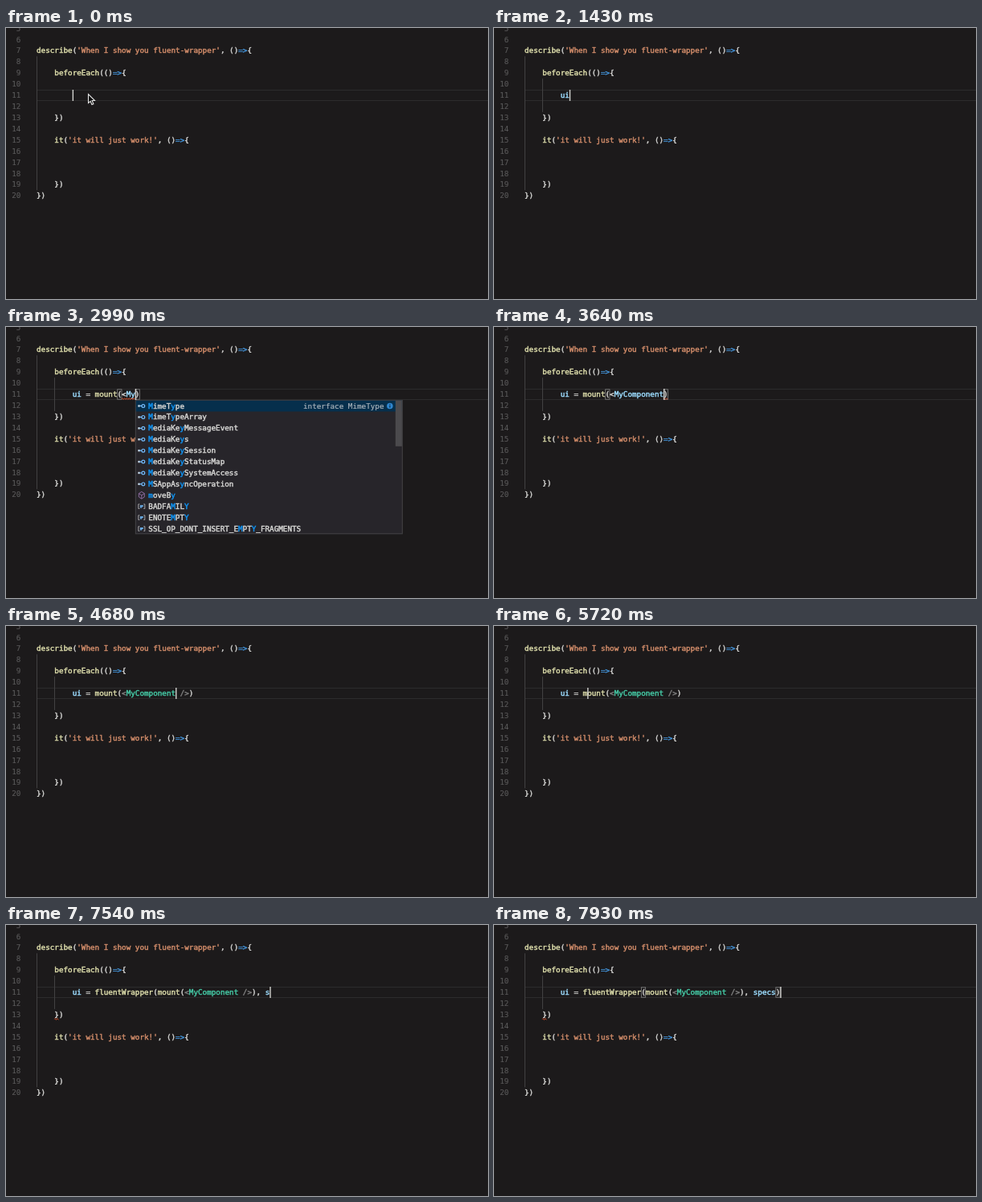
Recreate the animation shown at these times as an HTML page with a canvas. Size 600 by 338 pixels, loop 8 s.

```html
<!DOCTYPE html>
<html lang="en">
<head>
<meta charset="utf-8">
<title>Typing a test</title>
<style>
  html, body { margin: 0; width: 100%; height: 100%; overflow: hidden; background: #1c1a1b; }
  canvas { display: block; }
</style>
</head>
<body>
<canvas id="stage" width="600" height="338"></canvas>
<script>
const ctx = document.getElementById('stage').getContext('2d');
const LOOP = 8000, TICK = 130;
const LEFT = 38, CHAR = 5.583, ROW = 13.92, POPUP_WIDTH = 333;
const FONT = '9.27px "DejaVu Sans Mono", monospace';
const C = {
  bg: '#1c1a1b', text: '#d6d6d4', fn: '#dcdcaa', str: '#d08b69', key: '#4394da',
  name: '#9cdcfe', tag: '#808080', comp: '#45c9a5', num: '#5b5a5b', error: '#d9532c',
  guide: '#424142'
};

const colX = col => LEFT + col * CHAR;
const rowY = line => 84 + (line - 11) * ROW;

function rect(x, y, w, h, color) {
  ctx.fillStyle = color;
  ctx.fillRect(x, y, w, h);
}

// Places each character on the editor's grid and returns the end position.
function write(text, x, centerY, color, weight = 0.45) {
  const baseline = Math.round(centerY + 3.1);
  ctx.font = FONT;
  ctx.fillStyle = ctx.strokeStyle = color;
  ctx.lineWidth = weight;
  for (const ch of text) {
    ctx.fillText(ch, x, baseline);
    if (weight) ctx.strokeText(ch, x, baseline);
    x += CHAR;
  }
  return x;
}

function writeSpans(line, col, spans) {
  let x = colX(col);
  for (const [text, color] of spans) x = write(text, x, rowY(line), color);
}

const arrow = [['()', C.text], ['=>', C.key], ['{', C.text]];
const staticLines = [
  [7, 0, [['describe', C.fn], ['(', C.text], ["'When I show you fluent-wrapper'", C.str], [', ', C.text], ...arrow]],
  [9, 4, [['beforeEach', C.fn], ['(', C.text], ...arrow]],
  [13, 4, [['})', C.text]]],
  [15, 4, [['it', C.fn], ['(', C.text], ["'it will just work!'", C.str], [', ', C.text], ...arrow]],
  [19, 4, [['})', C.text]]],
  [20, 0, [['})', C.text]]]
];

// Typing: start, ms per key, text before, typed text, text after the caret.
const MOUNT = 'mount(<MyComponent />)';
const WRAPPED = 'ui = fluentWrapper(' + MOUNT;
const typing = [
  [0, 1, '', '', ''],
  [1300, 130, '', 'ui', ''],
  [1820, 130, 'ui', ' = ', ''],
  [2210, 110, 'ui = ', 'mount', ''],
  [2730, 130, 'ui = mount', '(', ')'],
  [2860, 65, 'ui = mount(', '<My', ')'],
  [3120, 65, 'ui = mount(<My', 'Component', ')'],
  [3770, 130, 'ui = mount(<MyComponent', ' />', ')'],
  [5850, 70, 'ui = ', 'fluentWrapper(', MOUNT],
  [7150, 1, WRAPPED, '', ''],
  [7280, 130, WRAPPED, ', s', ''],
  [7610, 65, WRAPPED + ', s', 'pecs)', '']
];

function editorState(t) {
  const [start, step, before, typed, after] = typing.findLast(k => t >= k[0]);
  const head = before + typed.slice(0, Math.floor((t - start) / step) + 1);
  let caret = head.length;
  if (t >= 4290 && t < 5850) {
    const repeats = t < 4620 ? 0 : Math.floor((t - 4620) / 58) + 1;
    caret = Math.max(5, caret - 1 - repeats);
  }
  return { head, text: head + after, caret };
}

function codeSpans(text) {
  const jsx = text.includes('/>');
  return text.match(/\w+|\/>|[^\w]/g)?.map((token, i, all) => {
    let color = C.text;
    if (/\w/.test(token)) color = all[i + 1] === '(' ? C.fn : jsx && all[i - 1] === '<' ? C.comp : C.name;
    else if (jsx && /^(<|\/>)$/.test(token)) color = C.tag;
    return [token, color];
  }) ?? [];
}

function bracketPair(text, caret) {
  const open = [], pairs = [];
  [...text].forEach((ch, i) => {
    if (ch === '(') open.push(i);
    if (ch === ')' && open.length) pairs.push([open.pop(), i]);
  });
  const touching = at => pairs.find(pair => pair.includes(at));
  return touching(caret) || touching(caret - 1) || [];
}

// Suggestion rows are "kind:name"; i interface, m method, c constant.
const popups = [
  { from: 1560, to: 1820, col: 10, detail: 'interface UIEvent',
    rows: 'i:UIEvent i:UIEventInit i:Uint8Array i:Uint16Array i:Uint32Array i:Uint8ClampedArray i:MutationEvent i:MutationObserver i:MutationRecord m:requestIdleCallback c:undefined c:outerWidth' },
  { from: 2470, to: 2730, col: 15, detail: 'function mount',
    rows: 'm:mount m:moveBy m:moveTo i:MouseEvent i:MouseEventInit i:MimeTypeArray i:MediaDeviceInfo i:MutationObserver i:MessagePort i:MessageEvent c:module c:onmouseout' },
  { from: 2990, to: 3250, col: 22, detail: 'interface MimeType',
    rows: 'i:MimeType i:MimeTypeArray i:MediaKeyMessageEvent i:MediaKeys i:MediaKeySession i:MediaKeyStatusMap i:MediaKeySystemAccess i:MSAppAsyncOperation m:moveBy c:BADFAMILY c:ENOTEMPTY c:SSL_OP_DONT_INSERT_EMPTY_FRAGMENTS' },
  { from: 3510, to: 3640, col: 29, detail: '', rows: 'c:MyComponent' },
  { from: 7670, to: 7870, col: 53, detail: 'const specs',
    rows: 'c:specs c:speechSynthesis i:SpeechSynthesis i:SpeechSynthesisEvent i:SpeechSynthesisUtterance i:SpeechSynthesisVoice i:SVGPathElement i:SVGPatternElement i:StereoPannerNode i:StylePropertyMap m:setPrototypeOf m:stop' }
];

function kindIcon(kind, x, y) {
  ctx.lineWidth = 1.2;
  ctx.strokeStyle = '#75beff';
  ctx.beginPath();
  if (kind === 'i') {
    rect(x - 4.5, y - 1.2, 2.4, 2.4, '#c5d5e2');
    ctx.moveTo(x - 2.5, y);
    ctx.lineTo(x, y);
    ctx.arc(x + 2, y, 1.9, Math.PI, 3 * Math.PI);
  } else if (kind === 'm') {
    ctx.lineWidth = 1;
    ctx.strokeStyle = '#8d6b9f';
    for (let i = 0; i <= 6; i++) {
      const a = Math.PI * (i / 3 + 0.5);
      ctx.lineTo(x + 4 * Math.cos(a), y + 4.4 * Math.sin(a));
    }
    ctx.moveTo(x - 3.5, y - 2.2);
    ctx.lineTo(x, y);
    ctx.lineTo(x + 3.5, y - 2.2);
    ctx.moveTo(x, y);
    ctx.lineTo(x, y + 4.4);
  } else {
    rect(x - 2, y - 1.5, 4, 2, '#6cb0ea');
    rect(x - 2, y + 0.5, 2.4, 1.4, '#6cb0ea');
    ctx.lineWidth = 1;
    ctx.strokeStyle = '#a5a5a7';
    for (const s of [-1, 1]) {
      ctx.moveTo(x + s * 2.5, y - 2.8);
      ctx.lineTo(x + s * 4, y - 2.8);
      ctx.lineTo(x + s * 4, y + 2.8);
      ctx.lineTo(x + s * 2.5, y + 2.8);
    }
  }
  ctx.stroke();
}

function drawPopup({ col, detail, rows }, word) {
  const items = rows.split(' ');
  const x = Math.min(colX(col), 600 - POPUP_WIDTH), top = 91.5;
  const height = items.length * ROW - 0.7;
  rect(x, top - 0.5, POPUP_WIDTH, height + 1, '#454447');
  rect(x + 1, top + 0.3, POPUP_WIDTH - 2, height - 0.8, '#27252a');
  rect(x + 1, top + 0.3, POPUP_WIDTH - 2, ROW - 0.3, '#062f4c');
  items.forEach((item, i) => {
    const [kind, name] = item.split(':');
    const y = top + (i + 0.5) * ROW;
    kindIcon(kind, x + 8, y);
    let cx = x + 16.5, matched = 0;
    for (const ch of name) {
      const hit = ch.toLowerCase() === word[matched]?.toLowerCase();
      if (hit) matched++;
      cx = write(ch, cx, y, hit ? '#1094f4' : C.text);
    }
  });
  if (detail) {
    const y = top + ROW / 2;
    write(detail, x + 309.7 - detail.length * CHAR, y, '#a9b2ba', 0.2);
    ctx.fillStyle = '#2f86cf';
    ctx.beginPath();
    ctx.arc(x + 317, y, 3.8, 0, 7);
    ctx.fill();
    rect(x + 316.5, y - 2.3, 1.1, 1.1, '#0a2c46');
    rect(x + 316.5, y - 0.6, 1.1, 2.8, '#0a2c46');
  }
  if (items.length > 11) rect(x + 324, top + 0.3, 8, 57, '#4b4a4d');
}

// Error underlines: from, to, line, column, length.
const errors = [
  [1820, 2340, 13, 4, 1],
  [2860, 3510, 11, 19, 3],
  [3510, 4030, 11, 31, 1],
  [7280, 8000, 13, 4, 1]
];

function squiggle(line, col, length) {
  const y = rowY(line) + 5.6;
  ctx.strokeStyle = C.error;
  ctx.lineWidth = 1;
  ctx.beginPath();
  for (let dx = 0; dx <= length * CHAR; dx += 0.7) {
    ctx.lineTo(colX(col) + dx, y - 0.9 * Math.sin(dx * 2.2));
  }
  ctx.stroke();
}

function drawPointer(x, y) {
  const shape = [[0, 0], [0, 11], [2.6, 8.8], [4.4, 13], [6.4, 12.1], [4.6, 8], [8, 8]];
  ctx.beginPath();
  for (const [dx, dy] of shape) ctx.lineTo(x + dx, y + dy);
  ctx.closePath();
  ctx.fillStyle = '#0b0b0b';
  ctx.strokeStyle = '#e6e6e6';
  ctx.lineWidth = 1.1;
  ctx.fill();
  ctx.stroke();
}

function draw(t) {
  const { head, text, caret } = editorState(t);
  const idle = t < 1300;
  rect(0, 0, 600, 338, C.bg);
  for (const y of [77, 90]) rect(LEFT, y, 562, 1, '#2c2b2c');
  rect(LEFT, rowY(8) - ROW / 2, 1, 12 * ROW, C.guide);
  if (!idle) rect(Math.round(colX(4)), rowY(10) - ROW / 2, 1, 3 * ROW, C.guide);

  for (let n = 5; n <= 20; n++) write(String(n), 18.3 - String(n).length * CHAR, rowY(n), C.num, 0.1);
  for (const line of staticLines) writeSpans(...line);

  ctx.strokeStyle = '#858585';
  ctx.lineWidth = 0.8;
  for (const at of bracketPair(text, caret)) ctx.strokeRect(colX(8 + at) + 0.2, 77.8, CHAR - 0.3, 12.4);
  writeSpans(11, 8, codeSpans(text));
  for (const [from, to, ...place] of errors) if (t >= from && t < to) squiggle(...place);

  const blinkedOff = t >= 260 && t < 780;
  if (!blinkedOff) rect(colX(8 + caret), 77, 1.4, 14, '#d0d0cd');

  const popup = popups.find(p => t >= p.from && t < p.to);
  if (popup) drawPopup(popup, head.match(/\w*$/)[0]);
  if (idle) drawPointer(102.5, 82.5);
}

function frame() {
  const t = performance.now() % LOOP;
  draw(Math.floor(t / TICK) * TICK);
  requestAnimationFrame(frame);
}
frame();
</script>
</body>
</html>
```
